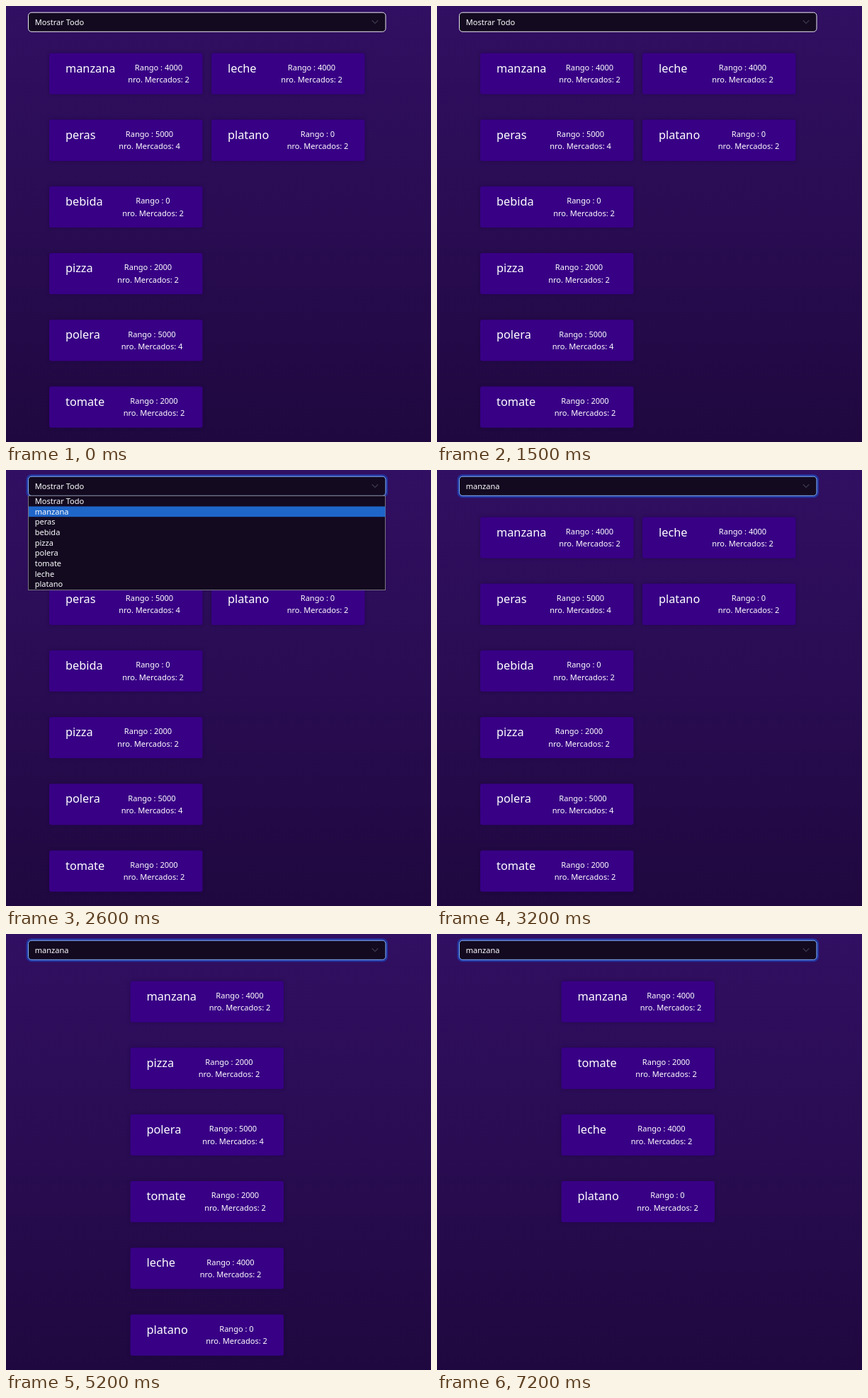
These frames come from a looping animation (600x616 px, 8000 ms). An HTML page:

```html
<!DOCTYPE html>
<html lang="es">
<head>
<meta charset="utf-8">
<title>Lista de productos</title>
<style>
  html, body { margin: 0; width: 600px; height: 616px; overflow: hidden; }
  svg { display: block; font-family: "Noto Sans", "Open Sans", sans-serif; font-size: 11.05px; fill: #fff; }
  .name { font-size: 16.3px; font-weight: 500; }
  .card rect { fill: #380085; filter: drop-shadow(0 0 2px rgba(20, 0, 50, .5)); }
</style>
</head>
<body>
<svg width="600" height="616" viewBox="0 0 600 616">
  <defs>
    <linearGradient id="bg" x2="0" y2="1">
      <stop offset="0" stop-color="#310f62"/>
      <stop offset=".5" stop-color="#290c52"/>
      <stop offset="1" stop-color="#1f083f"/>
    </linearGradient>
  </defs>
  <rect width="600" height="616" fill="url(#bg)"/>
  <g id="cards"></g>
  <rect id="glow" x="30" y="7.7" width="507.5" height="30.1" rx="6" fill="none" stroke="#0d6efd" stroke-width="3"/>
  <rect id="box" x="31.5" y="9.2" width="504.5" height="27.1" rx="4.5" fill="#130a20"/>
  <path d="M517.2 20.8l3.8 3.8 3.8-3.8" fill="none" stroke="#3d3a4a" stroke-width="1.3" stroke-linecap="round" stroke-linejoin="round"/>
  <text id="value" x="40.7" y="27"></text>
  <g id="menu">
    <rect x="31.5" y="36.5" width="504" height="133" fill="#130a20" stroke="#777480"/>
    <rect id="mark" x="32" width="503.5" height="14.7" fill="#1f66c9"/>
    <g id="options"></g>
  </g>
</svg>
<script>
const $ = id => document.getElementById(id);

// name: [range, markets, centre of the details inside the card]
const items = {
  manzana: [4000, 2, 154.5],
  peras: [5000, 4, 141.5],
  bebida: [0, 2, 146.5],
  pizza: [2000, 2, 139.5],
  polera: [5000, 4, 145],
  tomate: [2000, 2, 148],
  leche: [4000, 2, 141.5],
  platano: [0, 2, 150]
};
const names = Object.keys(items);
const all = 'Mostrar Todo';
const perColumn = 6, pitch = 94.2, optionPitch = 14.67;

function card(name, x, y) {
  const [range, markets, mid] = items[name];
  return `<g class="card" transform="translate(${x} ${y})">
    <rect width="216.5" height="58.3" rx="3"/>
    <text class="name" x="23" y="27.2">${name}</text>
    <g text-anchor="middle">
      <text x="${mid}" y="24.4">Rango : ${range}</text>
      <text x="${mid}" y="41.8">nro. Mercados: ${markets}</text>
    </g></g>`;
}

function showCards(removed) {
  const list = names.filter((n, i) => i < 1 || i > removed);
  const left = list.length > perColumn ? 61 : 175.5;
  $('cards').innerHTML = list.map((n, i) =>
    card(n, left + 229 * Math.floor(i / perColumn), 66.4 + pitch * (i % perColumn))).join('');
}

$('options').innerHTML = [all, ...names].map((n, i) =>
  `<text x="40.7" y="${48 + optionPitch * i}">${n}</text>`).join('');

let shown = -1;
function frame(now) {
  const t = now % 8000;
  const removed = t < 4200 ? 0 : Math.floor((t - 3200) / 1000);
  if (removed !== shown) showCards(shown = removed);

  // focus ring fades in over 150 ms
  const p = Math.min(1, Math.max(0, (t - 1500) / 150));
  const focus = p * p * (3 - 2 * p);
  const mix = (a, b) => a + (b - a) * focus;
  $('glow').setAttribute('stroke-opacity', .4 * focus);
  $('box').setAttribute('stroke', `rgb(${mix(235, 134)},${mix(235, 183)},${mix(240, 254)})`);

  $('value').textContent = t < 3200 ? all : 'manzana';
  $('menu').style.display = t >= 1600 && t < 3200 ? '' : 'none';
  $('mark').setAttribute('y', 36.8 + (t < 2600 ? 0 : optionPitch));
  requestAnimationFrame(frame);
}
requestAnimationFrame(frame);
</script>
</body>
</html>
```
